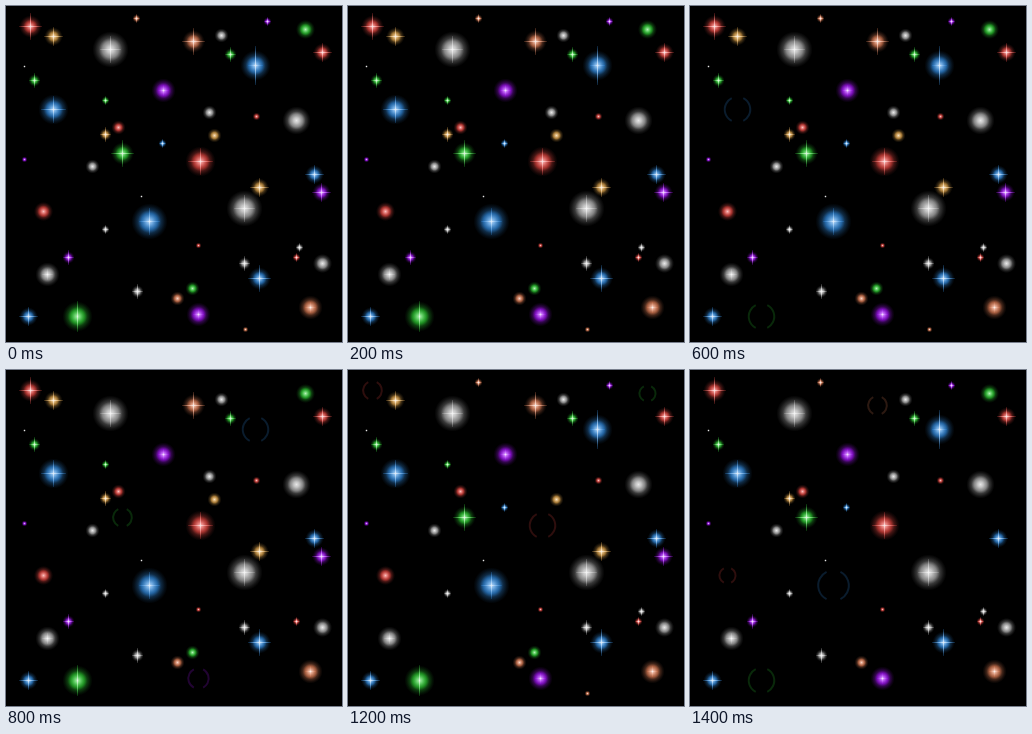
These frames come from a looping animation (336x336 px, 1.6 s). An HTML page with a canvas:

```html
<!DOCTYPE html>
<html lang="en">
<head>
<meta charset="utf-8">
<title>Twinkling stars</title>
<style>
html, body { margin: 0; width: 100%; height: 100%; overflow: hidden; background: #000; }
canvas { display: block; width: 336px; height: 336px; }
</style>
</head>
<body>
<canvas id="sky" width="336" height="336"></canvas>
<script>
const ctx = document.getElementById('sky').getContext('2d');
const STEP = 200, STEPS = 8;

// glow radius, vertical spike, horizontal spike
const KINDS = {
  huge: [18, 13, 10],
  tall: [15, 19, 7],
  large: [15, 13, 12],
  pole: [15, 15, 0],
  ball: [14, 0, 0],
  globe: [12, 5, 5],
  orb: [9.5, 0, 0],
  bead: [7, 0, 0],
  spot: [4, 0, 0],
  flare: [11, 13, 11],
  cross: [9, 9, 9],
  spark: [6, 7, 5],
  glint: [4, 4, 3],
  speck: [3, 0, 0],
  dot: [1.5, 0, 0]
};

// Each star: kind, x, y, steps in which it is out
const groups = [
  { rgb: [185, 185, 185], stars: [
    ['huge', 104, 43, ''], ['huge', 238, 202, '5'], ['ball', 290, 114, ''],
    ['globe', 41, 268, ''], ['orb', 316, 257, '2'], ['bead', 215, 29, ''],
    ['bead', 203, 106, '6'], ['bead', 86, 160, ''], ['spark', 131, 285, '16'],
    ['spark', 238, 257, ''], ['glint', 99, 223, '2'], ['glint', 293, 241, '24'],
    ['dot', 18, 60, ''], ['dot', 135, 190, '']
  ] },
  { rgb: [232, 72, 66], stars: [
    ['flare', 24, 20, '6'], ['large', 194, 155, '6'], ['cross', 316, 46, '5'],
    ['orb', 37, 205, '7'], ['bead', 112, 121, '25'], ['spot', 250, 110, ''],
    ['speck', 192, 239, '2'], ['glint', 290, 251, '']
  ] },
  { rgb: [222, 125, 85], stars: [
    ['flare', 187, 35, '7'], ['globe', 304, 301, '5'], ['bead', 171, 292, ''],
    ['glint', 130, 12, '4'], ['speck', 239, 323, '47']
  ] },
  { rgb: [225, 165, 75], stars: [
    ['cross', 47, 30, '7'], ['spark', 99, 128, '6'], ['bead', 208, 129, '7'],
    ['cross', 253, 181, '7']
  ] },
  { rgb: [45, 205, 50], stars: [
    ['orb', 299, 23, '6'], ['spark', 224, 48, '25'], ['spark', 28, 74, ''],
    ['glint', 99, 94, '27'], ['flare', 116, 147, '4'], ['bead', 186, 282, '7'],
    ['pole', 71, 310, '37']
  ] },
  { rgb: [50, 140, 225], stars: [
    ['tall', 249, 59, '4'], ['large', 47, 103, '3'], ['glint', 156, 137, '45'],
    ['cross', 308, 168, ''], ['huge', 143, 215, '7'], ['flare', 253, 272, ''],
    ['cross', 22, 310, '2']
  ] },
  { rgb: [165, 20, 250], stars: [
    ['globe', 157, 84, ''], ['globe', 192, 308, '4'], ['cross', 315, 186, '7'],
    ['spark', 62, 251, '56'], ['glint', 261, 15, '24'], ['speck', 18, 153, '']
  ] }
];

const rgba = (c, a) => `rgba(${c.map(Math.round)},${a})`;
const tint = (c, k) => c.map(v => v + (255 - v) * k);

function drawGlow(x, y, r, c) {
  const g = ctx.createRadialGradient(x, y, 0, x, y, r);
  g.addColorStop(0, rgba(tint(c, .65), 1));
  g.addColorStop(.2, rgba(tint(c, .3), .95));
  g.addColorStop(.45, rgba(c, .72));
  g.addColorStop(.65, rgba(c, .3));
  g.addColorStop(.85, rgba(c, .1));
  g.addColorStop(1, rgba(c, 0));
  ctx.fillStyle = g;
  ctx.fillRect(x - r, y - r, 2 * r, 2 * r);
}

function drawSpike(x, y, dx, dy, c) {
  const g = ctx.createLinearGradient(x - dx, y - dy, x + dx, y + dy);
  g.addColorStop(0, rgba(c, .25));
  g.addColorStop(.3, rgba(tint(c, .45), .8));
  g.addColorStop(.5, rgba(tint(c, .85), 1));
  g.addColorStop(.7, rgba(tint(c, .45), .8));
  g.addColorStop(1, rgba(c, .25));
  ctx.fillStyle = g;
  ctx.fillRect(x - dx - .5, y - dy - .5, 2 * dx + 1, 2 * dy + 1);
}

// Faint side arcs left while a star is out
function drawTrace(x, y, r, c) {
  ctx.strokeStyle = rgba(c, .2);
  ctx.lineWidth = 2;
  for (const mid of [0, Math.PI]) {
    ctx.beginPath();
    ctx.arc(x, y, r * .85, mid - 1.1, mid + 1.1);
    ctx.stroke();
  }
}

function drawStar([kind, px, py, out], c, step) {
  const [r, v, h] = KINDS[kind], x = px + .5, y = py + .5;
  if (out.includes(step)) {
    if (r > 9) drawTrace(x, y, r, c);
    return;
  }
  drawGlow(x, y, r, c);
  if (h) drawSpike(x, y, h, 0, c);
  if (v) drawSpike(x, y, 0, v, c);
}

function draw(step) {
  ctx.fillStyle = '#000';
  ctx.fillRect(0, 0, 336, 336);
  for (const { rgb, stars } of groups)
    for (const star of stars) drawStar(star, rgb, step);
}

const start = performance.now();
function tick() {
  draw(Math.floor((performance.now() - start) / STEP) % STEPS);
  requestAnimationFrame(tick);
}
tick();
</script>
</body>
</html>
```
